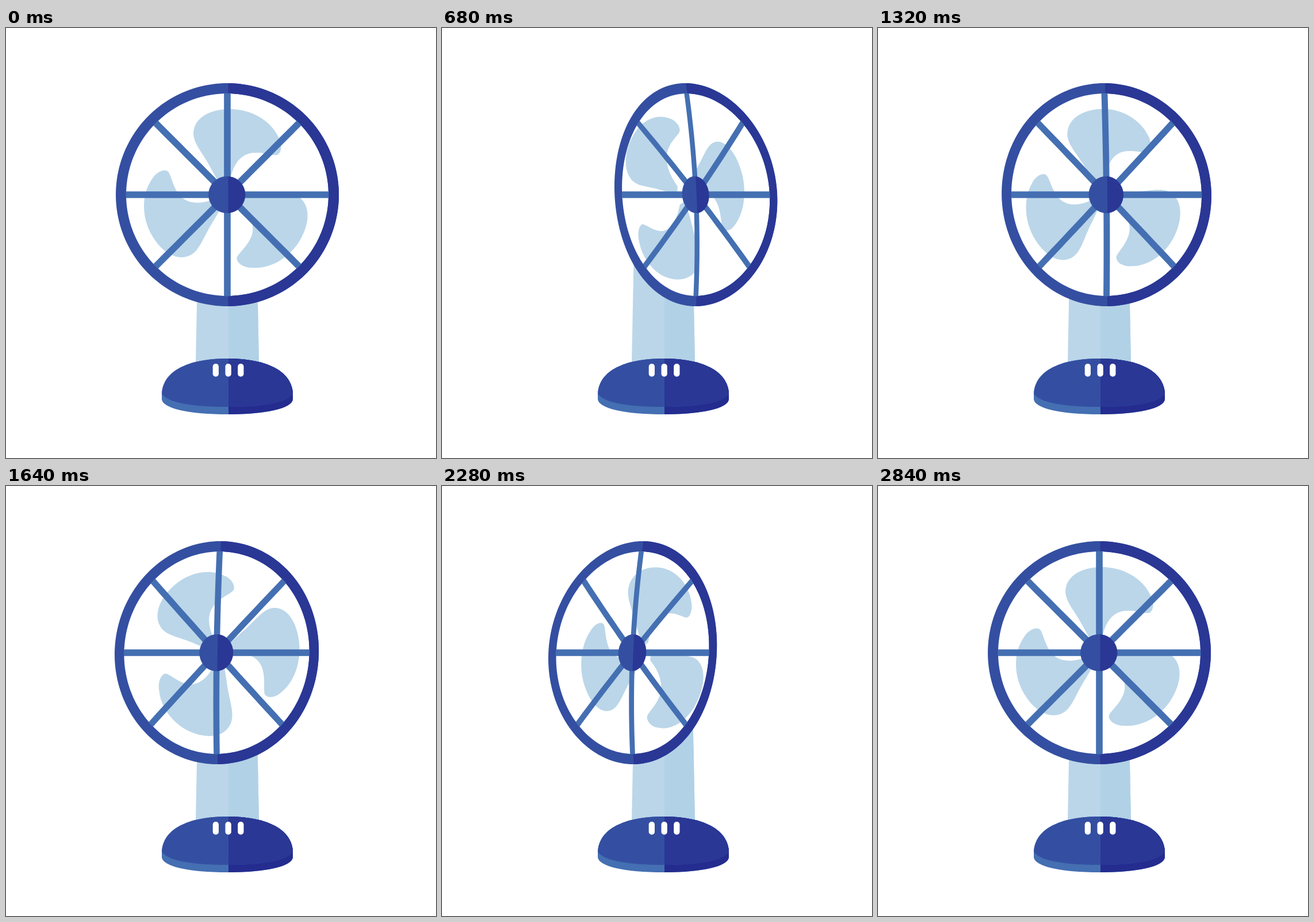
Write an HTML page with a canvas that moves like this. It is 748 px wide and 748 px high and loops after 2.88 s.

```html
<!DOCTYPE html>
<html lang="en">
<head>
<meta charset="utf-8">
<title>Desk fan</title>
<style>
  html, body { margin: 0; width: 100%; height: 100%; overflow: hidden; background: #fff; }
  canvas { display: block; width: 100vw; height: 100vh; }
</style>
</head>
<body>
<canvas id="stage" width="748" height="748"></canvas>
<script>
const ctx = document.getElementById('stage').getContext('2d');

const SIZE = 748, STEP = 40, FRAMES = 72, SPAN = 71, TURNS = 5;
const CX = 385, CY = 290, SEAM = 1.5;
const RIM = 194, RIM_IN = 176, HUB = 32;

const PALE = '#bbd6e9', PALE_SHADE = '#b1d1e6';
const BLUE = '#344fa1', NAVY = '#2a3795';
const STEEL = '#446fb2', DEEP = '#242c8f';

// Sideways swing of the head: [step, offset in px], periodic over SPAN
const SWING = [
  [0, 0], [11, 39.5], [18, 58], [24, 52], [28, 34.7], [33, 12.5],
  [42, -22], [50, -46.5], [56.5, -54], [64, -34.5], [70, -4.8]
];

function swingKey(i) {
  const n = SWING.length, lap = Math.floor(i / n);
  const [t, v] = SWING[i - lap * n];
  return [t + lap * SPAN, v];
}

function swing(step) {
  const t = step % SPAN;
  let i = 0;
  while (swingKey(i + 1)[0] <= t) i++;
  const [a, b, c, d] = [-1, 0, 1, 2].map(o => swingKey(i + o));
  const h = c[0] - b[0], x = (t - b[0]) / h;
  const m0 = (c[1] - a[1]) / (c[0] - a[0]) * h;
  const m1 = (d[1] - b[1]) / (d[0] - b[0]) * h;
  const x2 = x * x, x3 = x2 * x;
  return (2 * x3 - 3 * x2 + 1) * b[1] + (x3 - 2 * x2 + x) * m0 +
         (3 * x2 - 2 * x3) * c[1] + (x3 - x2) * m1;
}

// Shapes in the plane of the grille, as point lists around its centre
function circle(r, cx = 0) {
  return Array.from({ length: 180 }, (_, i) => {
    const a = i * Math.PI / 90;
    return [cx + r * Math.cos(a), r * Math.sin(a)];
  });
}

function curve(start, segments) {
  const pts = [start];
  let p = start;
  for (const [x1, y1, x2, y2, x3, y3] of segments) {
    for (let i = 1; i <= 16; i++) {
      const t = i / 16, q = 1 - t;
      const mix = (a, b, c, d) =>
        q * q * q * a + 3 * q * q * t * b + 3 * q * t * t * c + t * t * t * d;
      pts.push([mix(p[0], x1, x2, x3), mix(p[1], y1, y2, y3)]);
    }
    p = [x3, y3];
  }
  return pts;
}

function rotate(pts, a) {
  const c = Math.cos(a), s = Math.sin(a);
  return pts.map(([x, y]) => [x * c - y * s, x * s + y * c]);
}

function spoke(a) {
  const side = (w, from, to) =>
    Array.from({ length: 17 }, (_, i) => [from + (to - from) * i / 16, w]);
  return rotate([...side(-5.8, 0, 176.5), ...side(5.8, 176.5, 0)], a);
}

function rightSide() {
  const pts = [[400, 220], [400, -220]];
  for (let v = -220; v <= 220; v += 11) pts.push([SEAM, v]);
  return pts;
}

const BLADE = curve([4, -18], [
  [6, -42, 18, -73, 48, -73],
  [63, -74, 78, -68, 86, -69],
  [95, -72, 96, -88, 89, -100],
  [75, -130, 40, -149, 5, -149],
  [-33, -149, -59, -132, -59, -106],
  [-58, -87, -42, -72, -27, -43],
  [-22, -34, -16, -24, -8, -10]
]);
const SPOKES = Array.from({ length: 8 }, (_, i) => spoke(i * Math.PI / 4));
const RING = [circle(RIM), circle(RIM_IN)];
const CAP = [circle(HUB, -0.8)];
const RIGHT = rightSide();

function trace(loops, map) {
  ctx.beginPath();
  for (const pts of loops) {
    pts.forEach((p, i) => ctx[i ? 'lineTo' : 'moveTo'](...map(p)));
    ctx.closePath();
  }
}

function fill(loops, color, map) {
  trace(loops, map);
  ctx.fillStyle = color;
  ctx.fill('evenodd');
}

function fillTwoTone(loops, map) {
  fill(loops, BLUE, map);
  ctx.save();
  trace([RIGHT], map);
  ctx.clip();
  fill(loops, NAVY, map);
  ctx.restore();
}

function fillSplit(path, left, right) {
  ctx.fillStyle = left;
  ctx.fill(path);
  ctx.save();
  ctx.beginPath();
  ctx.rect(387, 0, SIZE, SIZE);
  ctx.clip();
  ctx.fillStyle = right;
  ctx.fill(path);
  ctx.restore();
}

const NECK = new Path2D('M334 380L436 380L440 582L330 582Z');
const FOOT = new Path2D('M271 636C273 596 318 575 385 575C452 575 497 596 499 636' +
  'L499 646C497 662 452 672 385 672C318 672 273 662 271 646Z');
const DOME = new Path2D('M271 636C273 596 318 575 385 575C452 575 497 596 499 636' +
  'C490 652 445 659 385 659C325 659 280 652 271 636Z');

function drawStand() {
  fillSplit(NECK, PALE, PALE_SHADE);
  fillSplit(FOOT, STEEL, DEEP);
  fillSplit(DOME, BLUE, NAVY);
  ctx.fillStyle = '#fff';
  for (const x of [359.7, 381.5, 403.2]) {
    ctx.beginPath();
    ctx.roundRect(x, 584, 10.3, 22.5, 4.8);
    ctx.fill();
  }
}

function drawHead(step) {
  const d = swing(step);
  const squeeze = 1 - Math.abs(d) / (d > 0 ? 209 : 218);
  const map = ([u, v]) => {
    const w = v / RIM_IN;
    return [CX + d * (1 + 0.142 * (w - w * w)) + squeeze * u, CY + v];
  };
  // The rotor sits behind the grille, so it lags the swing
  const lag = -0.41 * d / squeeze;
  const spin = step / SPAN * TURNS * 2 * Math.PI;

  fill([circle(RIM - 3)], '#fff', map);
  for (let i = 0; i < 3; i++) {
    const blade = rotate(BLADE, spin + i * 2 * Math.PI / 3);
    fill([blade.map(([x, y]) => [x + lag, y])], PALE, map);
  }
  fillTwoTone(RING, map);
  for (const s of SPOKES) fill([s], STEEL, map);
  fillTwoTone(CAP, map);
}

function draw(now) {
  const step = Math.floor(now / STEP) % FRAMES;
  ctx.fillStyle = '#fff';
  ctx.fillRect(0, 0, SIZE, SIZE);
  drawStand();
  drawHead(step);
}

let start;
function tick(now) {
  start ??= now;
  draw(now - start);
  requestAnimationFrame(tick);
}
draw(0);
requestAnimationFrame(tick);
</script>
</body>
</html>
```
